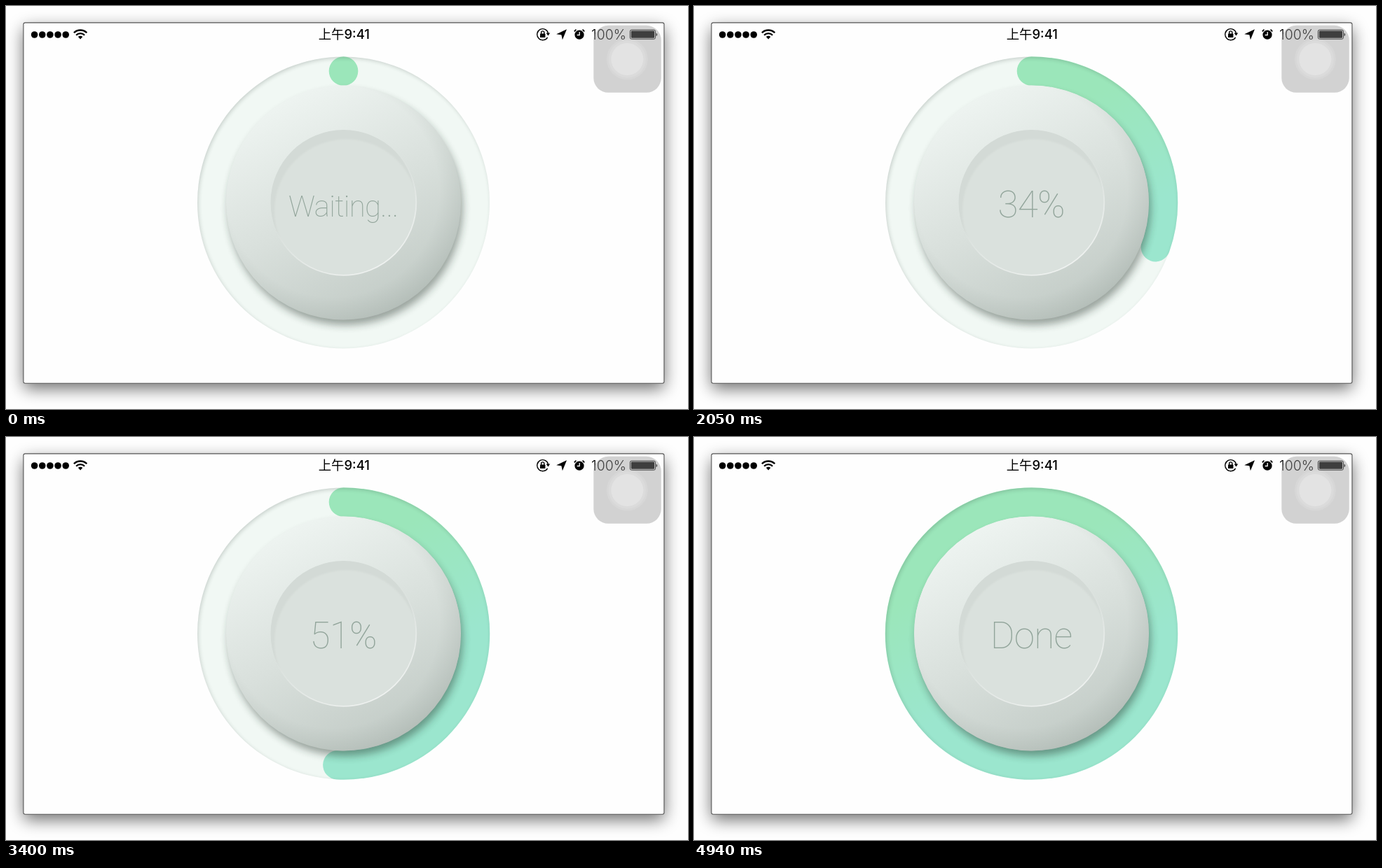
An HTML page for the animation above (6.38 s loop, 973 by 576 pixels).

```html
<!DOCTYPE html>
<html lang="zh">
<head>
<meta charset="utf-8">
<title>Progress dial</title>
<style>
  html, body { margin: 0; width: 100%; height: 100%; overflow: hidden; background: #fefefe; }
  svg { display: block; width: 100vw; height: 100vh; }
  .status { font-family: Inter, "Noto Sans CJK SC", "Noto Sans CJK", sans-serif; }
  #label { font-family: Roboto, Inter, sans-serif; font-weight: 100; letter-spacing: -.7px; }
</style>
</head>
<body>
<svg viewBox="0 0 973 576">
  <defs>
    <filter id="windowBlur" x="-10%" y="-10%" width="120%" height="120%"><feGaussianBlur stdDeviation="11.5"/></filter>
    <filter id="discBlur" x="-20%" y="-20%" width="140%" height="140%"><feGaussianBlur stdDeviation="6"/></filter>
    <filter id="edgeBlur" x="-10%" y="-10%" width="120%" height="120%"><feGaussianBlur stdDeviation="3"/></filter>
    <filter id="softBlur"><feGaussianBlur stdDeviation="1"/></filter>
    <linearGradient id="arcFill" gradientUnits="userSpaceOnUse" x1="400" y1="90" x2="550" y2="450">
      <stop offset=".25" stop-color="#9be6ba"/>
      <stop offset=".7" stop-color="#9be6ce"/>
    </linearGradient>
    <linearGradient id="discFill" gradientUnits="userSpaceOnUse" x1="405" y1="128" x2="560" y2="436">
      <stop offset="0" stop-color="#eef4f1"/>
      <stop offset=".5" stop-color="#d9e0dc"/>
      <stop offset="1" stop-color="#c1cac5"/>
    </linearGradient>
    <radialGradient id="discShade" gradientUnits="userSpaceOnUse" cx="466" cy="264" r="190">
      <stop offset=".8" stop-color="#55635b" stop-opacity="0"/>
      <stop offset="1" stop-color="#55635b" stop-opacity=".12"/>
    </radialGradient>
    <linearGradient id="rim" gradientUnits="userSpaceOnUse" x1="470" y1="262" x2="535" y2="372">
      <stop offset="0" stop-color="#fff" stop-opacity="0"/>
      <stop offset="1" stop-color="#fff" stop-opacity=".6"/>
    </linearGradient>
    <clipPath id="trackClip"><circle cx="481.5" cy="281" r="208.5"/></clipPath>
    <clipPath id="wellClip"><circle cx="481.5" cy="281" r="104"/></clipPath>
  </defs>

  <!-- window -->
  <rect width="973" height="576" fill="#fefefe"/>
  <rect x="25" y="32" width="914" height="515" rx="4" opacity=".56" filter="url(#windowBlur)"/>
  <rect x="24.9" y="23.9" width="914" height="515.3" rx="2.5" fill="#fefefe" stroke="#555" stroke-width="1.1"/>

  <!-- status bar -->
  <g id="signal"></g>
  <g fill="none" stroke="#000" stroke-width="2.3">
    <path d="M96.9 38.3a13 13 0 0 1 18.4 0M100.1 41.7a8.5 8.5 0 0 1 12 0"/>
    <path d="M106.1 47.5l-3.2-3.4a4.6 4.6 0 0 1 6.4 0z" fill="#000" stroke="none"/>
  </g>
  <text class="status" x="482.3" y="47.3" font-size="18.4" font-weight="500" text-anchor="middle">上午9:41</text>
  <g fill="none" stroke="#000" stroke-width="1.4">
    <path d="M772.6 44.8a8 8 0 1 1 .9-6"/>
    <path d="M770.6 38.6h5.6l-2.8 3.8z" fill="#000" stroke="none"/>
    <rect x="762" y="39.6" width="7.4" height="5.4" rx=".6" fill="#000" stroke="none"/>
    <path d="M763.6 40v-2a2.1 2.1 0 0 1 4.2 0v2"/>
  </g>
  <path d="M800 33.2L793.9 48.2L792.4 41.2L785.2 40.2Z"/>
  <circle cx="818" cy="41.2" r="6.6"/>
  <path d="M810.9 36.4a8.6 8.6 0 0 1 2.6-2.6M822.5 33.8a8.6 8.6 0 0 1 2.6 2.6" fill="none" stroke="#000" stroke-width="1.8"/>
  <path d="M818.2 37v4.5h-3.6" fill="none" stroke="#fff" stroke-width="1.3"/>
  <text class="status" x="860" y="47.7" font-size="19.4" font-weight="300" text-anchor="middle">100%</text>
  <rect x="890.4" y="34.2" width="36" height="13" rx="2" fill="none" stroke="#000"/>
  <rect x="891.8" y="35.6" width="33.2" height="10.2" rx="1"/>
  <path d="M927.6 38.4a2.6 2.6 0 0 1 0 4.8z"/>

  <!-- floating button -->
  <rect x="838.3" y="27.8" width="96.4" height="96" rx="21" fill="#949494" fill-opacity=".42"/>
  <g fill="#fff">
    <circle cx="886.3" cy="76" r="29.5" opacity=".1"/>
    <circle cx="886.3" cy="76" r="26.5" opacity=".1"/>
    <circle cx="886.3" cy="76" r="23" opacity=".22"/>
  </g>

  <!-- dial -->
  <circle cx="481.5" cy="281" r="208.5" fill="#f1f8f4"/>
  <path id="arc" d="M481.5 93a188 188 0 0 1 0 376a188 188 0 0 1 0-376" pathLength="360"
        fill="none" stroke="url(#arcFill)" stroke-width="41.6" stroke-linecap="round"/>
  <g clip-path="url(#trackClip)">
    <circle cx="483" cy="283" r="229.5" fill="none" stroke="#22332b" stroke-width="40" opacity=".24" filter="url(#edgeBlur)"/>
  </g>
  <circle cx="484.5" cy="289" r="167" fill="#1c2b22" opacity=".42" filter="url(#discBlur)"/>
  <circle cx="481.5" cy="281" r="167.5" fill="url(#discFill)"/>
  <circle cx="481.5" cy="281" r="167.5" fill="url(#discShade)"/>
  <g clip-path="url(#wellClip)">
    <circle cx="481.5" cy="281" r="105" fill="#d3dad6"/>
    <circle cx="485.5" cy="293" r="102.5" fill="#dae1dd" filter="url(#softBlur)"/>
  </g>
  <circle cx="481.5" cy="281" r="103.8" fill="none" stroke="url(#rim)" stroke-width="1.8"/>
  <text id="label" x="481.2" text-anchor="middle" fill="#91a49a"></text>
</svg>

<script>
  const LOOP = 6380, BEGIN = 1080;
  const arc = document.getElementById('arc');
  const label = document.getElementById('label');

  document.getElementById('signal').innerHTML = [0, 1, 2, 3, 4]
    .map(i => `<circle cx="${40.6 + i * 11.15}" cy="41" r="4.8"/>`).join('');

  // Changes of pace; the arc trails the percentage, which stops at 100.
  const paces = [
    { at: 1000, angle: 0, percent: 0 },
    { at: 1580, angle: 64.8, percent: 24 },
    { at: 2430, angle: 146, percent: 42 },
    { at: 3400, angle: 182.6, percent: 51 },
    { at: 3960, angle: 201.8, percent: 57 },
    { at: 4350, angle: 221, percent: 66 },
    { at: 4590, angle: 252.4, percent: 88 },
    { at: 4940, angle: 360, percent: 112 }
  ];

  function progress(t) {
    const last = paces.length - 1;
    const next = paces.findIndex(p => p.at >= t);
    const i = next < 0 ? last : Math.max(next, 1);
    const a = paces[i - 1], b = paces[i];
    const k = Math.min((t - a.at) / (b.at - a.at), 1);
    const mix = key => a[key] + (b[key] - a[key]) * k;
    return { angle: mix('angle'), percent: mix('percent') };
  }

  function setLabel(text, size, y) {
    label.textContent = text;
    label.setAttribute('font-size', size);
    label.setAttribute('y', y);
  }

  function draw(t) {
    const waiting = t < BEGIN;
    const { angle, percent } = progress(waiting ? 0 : t);
    const length = waiting ? .01 : angle;
    arc.setAttribute('stroke-dasharray', length >= 360 ? 'none' : `${length} 720`);
    if (waiting) setLabel('Waiting...', 42, 301);
    else if (percent >= 100) setLabel('Done', 53, 302);
    else setLabel(Math.round(percent) + '%', 53, 302);
  }

  const start = performance.now();
  function tick() {
    draw((performance.now() - start) % LOOP);
    requestAnimationFrame(tick);
  }
  tick();
</script>
</body>
</html>
```
